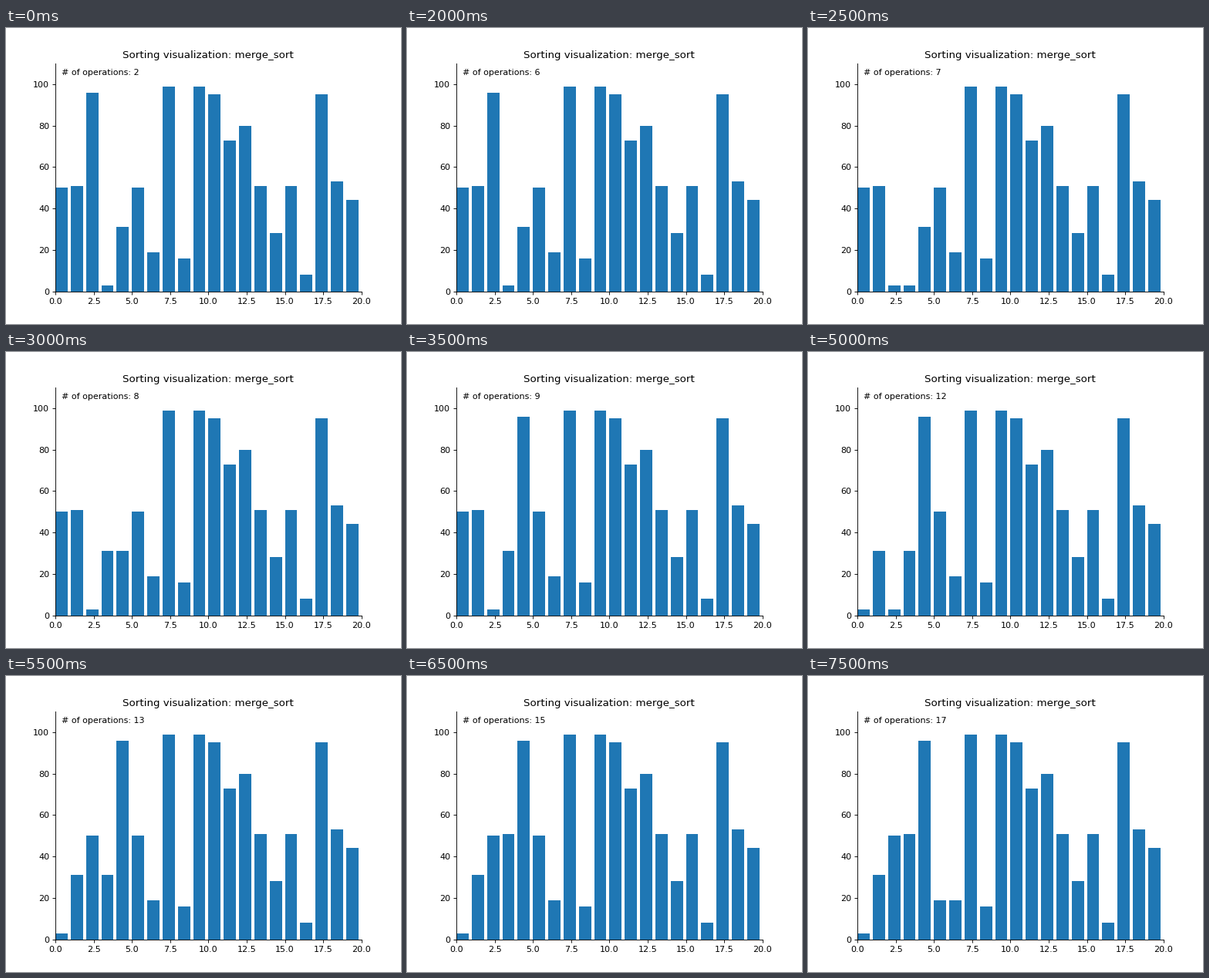
These frames come from a looping animation (512 by 384 pixels, 8 s). A matplotlib script:

```python
import matplotlib.pyplot as plt
from matplotlib.animation import FuncAnimation

VALUES = [50, 51, 96, 3, 31, 50, 19, 99, 16, 99,
          95, 73, 80, 51, 28, 51, 8, 95, 53, 44]
FIRST_OP, FRAMES, INTERVAL = 2, 16, 500


def merge_sort(a, lo, hi):
    """Sort a[lo:hi] in place, yielding after every write and every merge."""
    if hi - lo < 2:
        return
    mid = (lo + hi) // 2
    yield from merge_sort(a, lo, mid)
    yield from merge_sort(a, mid, hi)
    left, right = a[lo:mid], a[mid:hi]
    for k in range(lo, hi):
        take_left = not right or (left and left[0] <= right[0])
        a[k] = (left if take_left else right).pop(0)
        yield a
    yield a


states = [list(s) for s in merge_sort(list(VALUES), 0, len(VALUES))]

fig, ax = plt.subplots(figsize=(6.4, 4.8), dpi=80)
ax.set_title("Sorting visualization: merge_sort")
bars = ax.bar(range(len(VALUES)), VALUES, align="edge", color="#1f77b4")
ax.set_xlim(0, 20)
ax.set_ylim(0, 110)
ax.set_xticks([2.5 * i for i in range(9)])
ax.set_yticks(range(0, 101, 20))
ax.spines[["top", "right"]].set_visible(False)
label = ax.text(0.02, 0.95, "", transform=ax.transAxes)


def update(i):
    op = FIRST_OP + i
    for bar, height in zip(bars, states[op - 1]):
        bar.set_height(height)
    label.set_text(f"# of operations: {op}")
    return [*bars, label]


anim = FuncAnimation(fig, update, frames=FRAMES, interval=INTERVAL,
                     repeat=True, repeat_delay=0)
plt.show()
```
